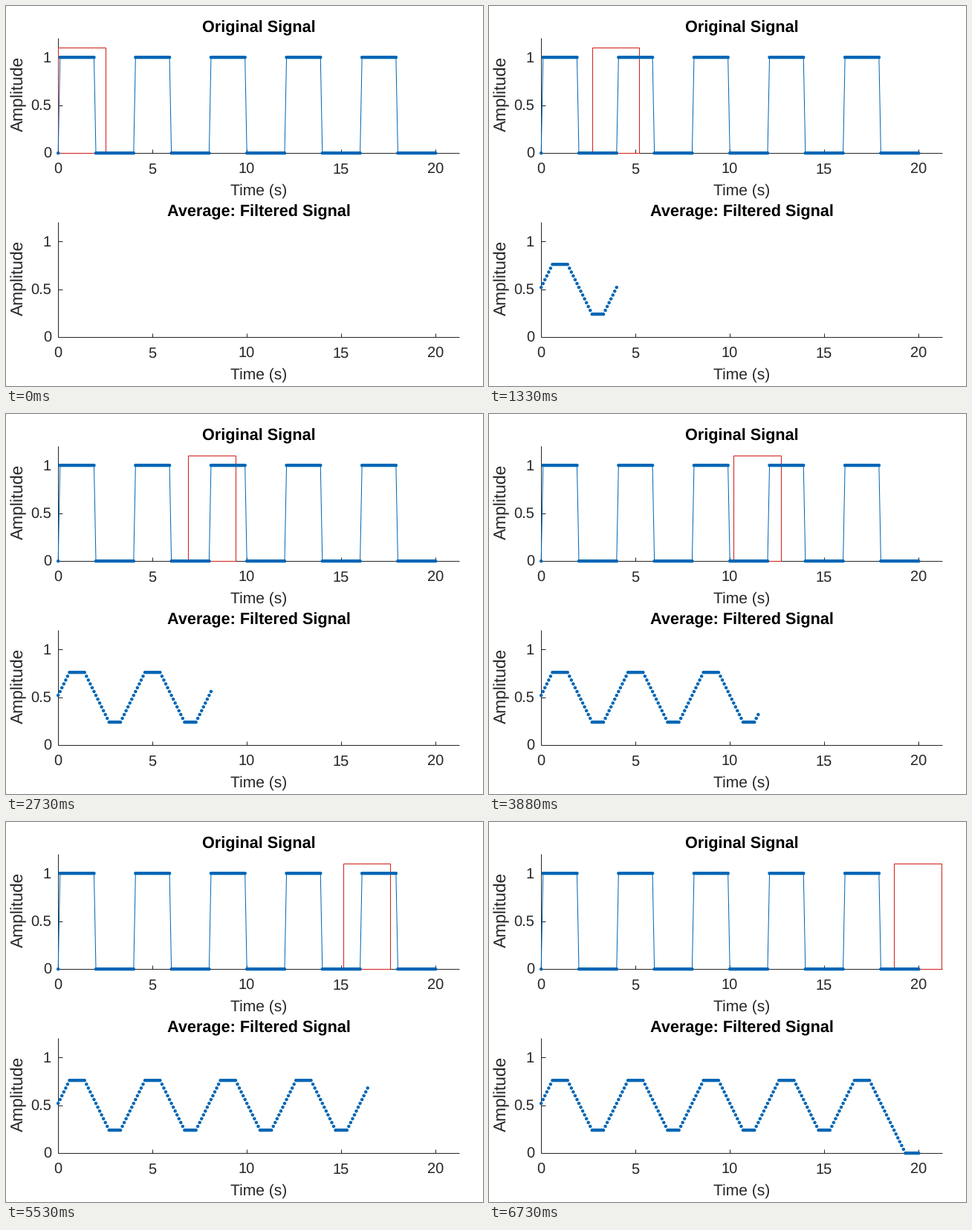
These frames come from a looping animation (642x512 px, 6.78 s). A matplotlib script:

```python
import numpy as np
import matplotlib.pyplot as plt
from matplotlib.animation import FuncAnimation
from matplotlib.patches import Rectangle

W, H, DPI = 642, 512, 64
PT = 72 / DPI                      # points per pixel
INK, BLUE, RED = "#262626", "#0066b5", "#d42a26"
LEFT, RIGHT, X_UNIT, Y_UNIT = 70.2, 610, 25.4, 129
TOP_BASE, LOW_BASE = 198.2, 446.2

N = 201
STEPS = 135                        # picture changes per loop
HALF = 13                          # half-width of the averaging window
TICK_MS, LOOP_MS = 20, 6780

plt.rcParams.update({"font.family": "Liberation Sans", "text.hinting": "none",
                     "path.simplify": False})
fig = plt.figure(figsize=(W / DPI, H / DPI), dpi=DPI, facecolor="white")
ax = fig.add_axes([0, 0, 1, 1])
ax.set_xlim(0, W)
ax.set_ylim(H, 0)
ax.axis("off")


def px(t):
    return LEFT + X_UNIT * np.asarray(t)


def py(v, base):
    return base - Y_UNIT * np.asarray(v)


def line(xs, ys):
    ax.plot(xs, ys, color=INK, lw=PT, zorder=2, solid_capstyle="butt")


def text(x, y, s, size, color=INK, **kw):
    kw = {"ha": "center", "va": "baseline", **kw}
    ax.text(x, y, s, fontsize=size * PT, color=color, **kw)


def panel(base, title):
    line([LEFT, LEFT], [base - 155, base])
    line([LEFT, RIGHT], [base, base])
    for t in range(0, 21, 5):
        line([px(t)] * 2, [base, base - 5.5])
        text(px(t) - 0.5, base + 28, str(t), 20)
    for v in (0, 0.5, 1):
        y = py(v, base)
        line([LEFT, LEFT + 5.5], [y, y])
        text(61, y + 7, f"{v:g}", 20, ha="right")
    text(340, base - 163, title, 21.6, "black", weight="bold")
    text(340.5, base + 56, "Time (s)", 21)
    text(23, base - 80, "Amplitude", 22.8, rotation=90, rotation_mode="anchor")


def specks(xs, ys):
    """Tiny separate strokes; round caps turn each into a dot."""
    gap = np.full(len(xs), np.nan)
    return (np.column_stack([xs - 0.01, xs + 0.01, gap]).ravel(),
            np.column_stack([ys, ys, gap]).ravel())


def dots(xs, ys):
    return ax.plot(*specks(xs, ys), color=BLUE, lw=4.6 * PT, snap=False,
                   solid_capstyle="round", zorder=5)[0]


panel(TOP_BASE, "Original Signal")
panel(LOW_BASE, "Average: Filtered Signal")

idx = np.arange(N)
phase = idx % 40
signal = ((phase > 0) & (phase < 20)).astype(float)
average = np.convolve(signal, np.ones(2 * HALF + 1) / 25, "same")
xs = px(idx / 10)
top_y, low_y = py(signal, TOP_BASE), py(average, LOW_BASE)

ax.plot(xs, top_y, color=BLUE, lw=PT, zorder=4, snap=False)
dots(xs, top_y)
trail = dots(xs[:0], low_y[:0])
window = ax.add_patch(Rectangle((LEFT, TOP_BASE - 1.1 * Y_UNIT), 2.5 * X_UNIT,
                                1.1 * Y_UNIT, fill=False, ec=RED, lw=1.1 * PT,
                                joinstyle="miter", zorder=3))


def draw(frame):
    ms = frame * TICK_MS + TICK_MS / 2
    step = int((ms + 20) // 50)
    pos = 0.45 + 1.4745 * step
    if step >= STEPS:
        pos = N - 1
    count = int(pos) + 1 if step else 0
    # the window moves on shortly before its average is plotted
    start = max(0, int(pos + 0.5) - HALF)
    trail.set_data(*specks(xs[:count], low_y[:count]))
    window.set_x(px(start / 10))
    return trail, window


anim = FuncAnimation(fig, draw, frames=LOOP_MS // TICK_MS, interval=TICK_MS,
                     repeat=True, repeat_delay=0, blit=False)
plt.show()
```
